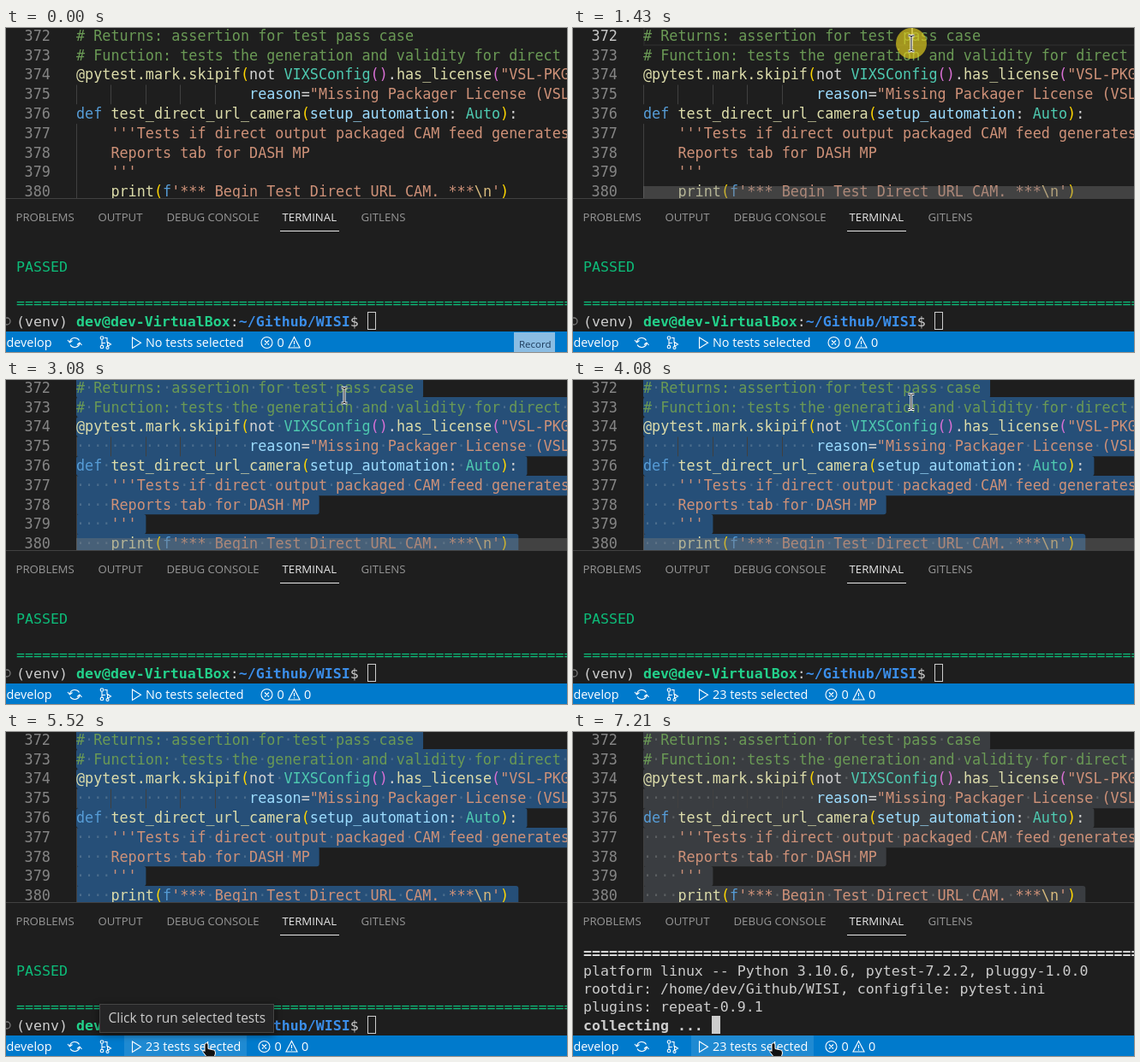
Animation of 655 by 379 pixels, one loop 8 s. Source, as an HTML page:

```html
<!DOCTYPE html>
<html lang="en">
<head>
<meta charset="utf-8">
<title>Running selected tests</title>
<style>
  html, body { margin: 0; height: 100%; overflow: hidden; background: #1e1e1e; }
  svg { display: block; width: 100vw; height: 100vh; }
  text { white-space: pre; font-family: "Open Sans", "Noto Sans", sans-serif; }
  .code text { font: 16.8px "DejaVu Sans Mono", monospace; }
  .term text { font: 16.6px "DejaVu Sans Mono", monospace; fill: #ccc; }
  .term .b { font-weight: bold; }
  .tab { font-size: 13.2px; fill: #979797; }
  .status text { font-size: 14.4px; fill: #fff; }
  .icon { fill: none; stroke: #fff; stroke-width: 1.1; }
</style>
</head>
<body>
<svg id="stage" viewBox="0 0 655 379"></svg>
<script>
const LOOP = 8000;
const CHAR = 10.114, LINE = 22.8, LEFT = 82, TOP = -1.9;

const INK = {
  comment: '#6a9955', fn: '#dcdcaa', key: '#569cd6', type: '#4ec9b0', param: '#9cdcfe',
  str: '#ce9178', esc: '#d7ba7d', gold: '#ffd700', pink: '#da70d6', plain: '#d4d4d4',
};

// Each line is a list of "ink|text" tokens.
const LINES = [
  ['comment|# Returns: assertion for test pass case'],
  ['comment|# Function: tests the generation and validity for direct url'],
  ['fn|@pytest.mark.skipif', 'gold|(', 'plain|not ', 'type|VIXSConfig', 'pink|()', 'plain|.',
    'fn|has_license', 'pink|(', 'str|"VSL-PKG"'],
  ['param|                    reason', 'plain|=', 'str|"Missing Packager License (VSL)"'],
  ['key|def ', 'fn|test_direct_url_camera', 'gold|(', 'param|setup_automation', 'plain|: ',
    'type|Auto', 'gold|)', 'plain|:'],
  ["str|    '''Tests if direct output packaged CAM feed generates in"],
  ['str|    Reports tab for DASH MP'],
  ["str|    '''"],
  ['fn|    print', 'gold|(', 'key|f', "str|'*** Begin Test Direct URL CAM. ***", 'esc|\\n', "str|'", 'gold|)'],
].map(line => line.map(token => token.split('|')));

const escapeText = s => s.replace(/&/g, '&amp;').replace(/</g, '&lt;');
const span = (fill, s, cls = '') => `<tspan fill="${fill}" class="${cls}">${escapeText(s)}</tspan>`;
const text = (x, y, body, attrs = '') => `<text x="${x}" y="${y}" ${attrs}>${body}</text>`;
const rect = (x, y, w, h, attrs) => `<rect x="${x}" y="${y}" width="${w}" height="${h}" ${attrs}/>`;
const baseline = i => Math.floor(TOP + LINE * i + 17.2);
const termRow = (row, body, attrs) => text(12, Math.floor(264 + 21.25 * row), body, attrs);

function codeLine(tokens, i) {
  return text(21.6, baseline(i), 372 + i, `fill="#858585" ${i ? '' : 'id="firstNumber"'}`) +
    text(LEFT, baseline(i), tokens.map(([ink, s]) => span(INK[ink], s)).join(''));
}

function guides() {
  const bar = (col, i, n) => rect(LEFT + Math.round(col * CHAR), TOP + LINE * i, 1, LINE * n, 'fill="#404040"');
  return [0, 4, 8, 12, 16].map(col => bar(col, 3, 1)).join('') + bar(0, 5, 4);
}

function selection() {
  const plain = LINES.map(line => line.map(token => token[1]).join(''));
  const blocks = plain.map((s, i) =>
    rect(LEFT, Math.floor(TOP + LINE * i), (s.length + 1) * CHAR + .5, LINE + .5, 'rx="3"')).join('');
  const dots = plain.map((s, i) =>
    text(LEFT, baseline(i), s.replace(/./g, c => c === ' ' ? '·' : ' '))).join('');
  return { blocks, dots };
}

const picked = selection();
const tabs = [[12, 'PROBLEMS'], [108, 'OUTPUT'], [188, 'DEBUG CONSOLE'], [323, 'TERMINAL'], [415, 'GITLENS']];
const BEAM = 'M-3.500-9h2.500l1 1 1-1h2.500M0-8v16M-3.500 9h2.500l1-1 1 1h2.500';

document.getElementById('stage').innerHTML = `
  ${rect(0, 0, 655, 379, 'fill="#1e1e1e"')}
  <g class="code">
    ${rect(83, -1, 700, 21, 'id="lineBox" fill="none" stroke="#282828" stroke-width="2"')}
    <g id="blocks">${picked.blocks}</g>
    ${guides()}
    <g id="dots" fill="#e3e4e2" fill-opacity=".2">${picked.dots}</g>
    ${LINES.map(codeLine).join('')}
    ${text(LEFT + 45 * CHAR, baseline(0), 'You, 5 months ago', 'id="blame" fill="#494949"')}
    ${rect(395, 0, 2, 21, 'id="caret" fill="#aeafad"')}
  </g>
  ${rect(82, 185, 573, 15, 'id="scrollbar" fill="#797979"')}

  ${rect(0, 199, 655, 156, 'fill="#1e1e1e"')}
  ${rect(0, 199, 655, 1, 'fill="#414141"')}
  ${tabs.map(([x, s]) => text(x - .5, 226, s, `class="tab" ${s === 'TERMINAL' ? 'style="fill:#e7e7e7"' : ''}`)).join('')}
  ${rect(320, 237, 69, 1, 'fill="#e7e7e7"')}

  <g class="term">
    <g id="oldOutput">
      ${termRow(1, span('#0dbc79', 'PASSED'))}
      ${termRow(3, span('#0dbc79', '='.repeat(66)))}
      <circle cx="1" cy="343" r="4" fill="none" stroke="#777" stroke-width="1.3"/>
      ${termRow(4, '(venv) ' + span('#23d18b', 'dev@dev-VirtualBox', 'b') + ':' +
        span('#3b8eea', '~/Github/WISI', 'b') + '$')}
      ${rect(422.5, 332.5, 9, 20, 'fill="none" stroke="#ccc"')}
    </g>
    <g id="header">${termRow(0, span('#e5e5e5', '='.repeat(66), 'b'))}</g>
    <g id="session">
      ${termRow(1, 'platform linux -- Python 3.10.6, pytest-7.2.2, pluggy-1.0.0')}
      ${termRow(2, 'rootdir: /home/dev/Github/WISI, configfile: pytest.ini')}
      ${termRow(3, 'plugins: repeat-0.9.1')}
      ${termRow(4, 'collecting ...', 'class="b"')}
    </g>
    ${rect(0, 332, 10, 21, 'id="block" fill="#ccc"')}
  </g>

  <g class="status">
    ${rect(0, 355, 655, 24, 'fill="#007acc"')}
    ${rect(138, 355, 143, 24, 'id="hover" fill="#fff"')}
    ${text(.5, 373, 'develop')}
    <path class="icon" d="M74.500 367a6 6 0 0 1 11-1.500M86 369a6 6 0 0 1-11 1.500M72 365l2.500 3 3-2.500M88.500 371l-2.500-3-3 2.500"/>
    <g class="icon">
      <path d="M112 364.500v7M115 362.500h3v5.500M112 368.500h4M118.500 367.500l4 2.500-4 2.500z"/>
      <circle cx="112" cy="362.500" r="1.800"/><circle cx="112" cy="373" r="1.800"/>
      <circle cx="118.500" cy="374" r="1.500"/>
    </g>
    <path class="icon" d="M147.500 362v12.500l10-6.250z"/>
    <text id="count" x="163" y="373"></text>
    <g id="problems">
      <g class="icon">
        <circle cx="304.500" cy="368" r="6.500"/>
        <path d="M302 365.500l5 5m0-5l-5 5M336.500 361.500l6.500 12.500h-13zM336.500 366v4m0 1.200v1.300"/>
      </g>
      ${text(316.5, 373, '0')}${text(348, 373, '0')}
    </g>
  </g>
  <g id="record">
    ${rect(593, 356, 48, 23, 'fill="#8bbde3"')}
    ${text(599, 374, 'Record', 'font-size="11.500" fill="#1d3c5c"')}
  </g>

  <g id="tooltip">
    ${rect(109.5, 318.5, 203, 33, 'fill="#252526" stroke="#454545" style="filter:drop-shadow(0 2px 4px #0008)"')}
    ${text(119.5, 340, 'Click to run selected tests', 'font-size="15.500" fill="#ccc"')}
  </g>

  <circle id="click" r="18" fill="#e1cd1e" fill-opacity=".68"/>
  <g id="pointer" stroke-linejoin="round">
    <g id="beam" fill="none">
      <path d="${BEAM}" stroke="#fff" stroke-width="3"/>
      <path d="${BEAM}" stroke="#111"/>
    </g>
    <path id="arrow" d="M0 0v15l3.500-3.500 2.500 5.500 2.500-1-2.500-5.500h5z" fill="#111" stroke="#fff"/>
    <path id="hand" d="M-2 1q2-3 4 0v5.500l6.500 1.500q2.500 1 2 4l-1.500 5h-8l-5-6.500q-1-2.500 1.500-2l.5 1z"
      fill="#111" stroke="#fff"/>
  </g>`;

const el = Object.fromEntries([...document.querySelectorAll('[id]')].map(node => [node.id, node]));

const between = (t, a, b) => t >= a && t < b;
const ramp = (t, a, b) => Math.min(1, Math.max(0, (t - a) / (b - a)));
const show = (node, visible) => node.style.display = visible ? '' : 'none';
const moveTo = (node, x, y) => node.setAttribute('transform', `translate(${x} ${y})`);

// time, x, y
const PATH = [
  [70, 614, 368], [450, 530, 215], [830, 419, 46], [1170, 395, 18],
  [4010, 395, 18], [4080, 395, 25], [4450, 335, 190], [4780, 245, 356], [4900, 234, 364],
];

function pointerAt(t) {
  const next = PATH.findIndex(p => p[0] > t);
  if (next < 0) return PATH.at(-1).slice(1);
  if (next === 0) return PATH[0].slice(1);
  const a = PATH[next - 1], b = PATH[next], k = ramp(t, a[0], b[0]);
  return [a[1] + (b[1] - a[1]) * k, a[2] + (b[2] - a[2]) * k];
}

function draw(t) {
  const [x, y] = pointerAt(t);
  const overItem = t >= 4780;
  const overText = y < 200 || between(y, 245, 355);
  show(el.pointer, t >= 70);
  moveTo(el.pointer, x, y);
  show(el.hand, overItem);
  show(el.beam, !overItem && overText);
  show(el.arrow, !overItem && !overText);
  show(el.click, between(t, 1430, 1560) || between(t, 6530, 6600));
  moveTo(el.click, x - (overItem ? 2 : 0), y + (overItem ? 2 : 0));

  const lineActive = between(t, 1430, 3080);
  el.firstNumber.setAttribute('fill', lineActive ? '#c6c6c6' : '#858585');
  show(el.lineBox, lineActive);
  show(el.blame, between(t, 1690, 3080));
  show(el.caret, between(t, 1430, 1960) || between(t, 2420, 2880));

  const selected = t >= 3080;
  show(el.blocks, selected);
  show(el.dots, selected);
  el.blocks.setAttribute('fill', t < 6530 ? '#264f78' : '#3a3d41');
  el.scrollbar.style.opacity = .4 * (ramp(t, 480, 600) - ramp(t, 4700, 5320));

  const counted = t >= 3160;
  el.count.textContent = counted ? '23 tests selected' : 'No tests selected';
  moveTo(el.problems, counted ? -3 : 0, 0);
  el.hover.style.opacity = !overItem ? 0 : between(t, 6530, 6600) ? .18 : .12;
  el.tooltip.style.opacity = t < 6530 ? ramp(t, 5440, 5520) : 0;
  el.record.style.opacity = 1 - ramp(t, 70, 350);

  show(el.oldOutput, t < 6740);
  show(el.header, t >= 7140);
  show(el.session, t >= 7210);
  show(el.block, t >= 6740);
  el.block.setAttribute('x', t < 7210 ? 12 : 162);
}

const start = performance.now();
function tick() {
  draw((performance.now() - start) % LOOP);
  requestAnimationFrame(tick);
}
tick();
</script>
</body>
</html>
```
